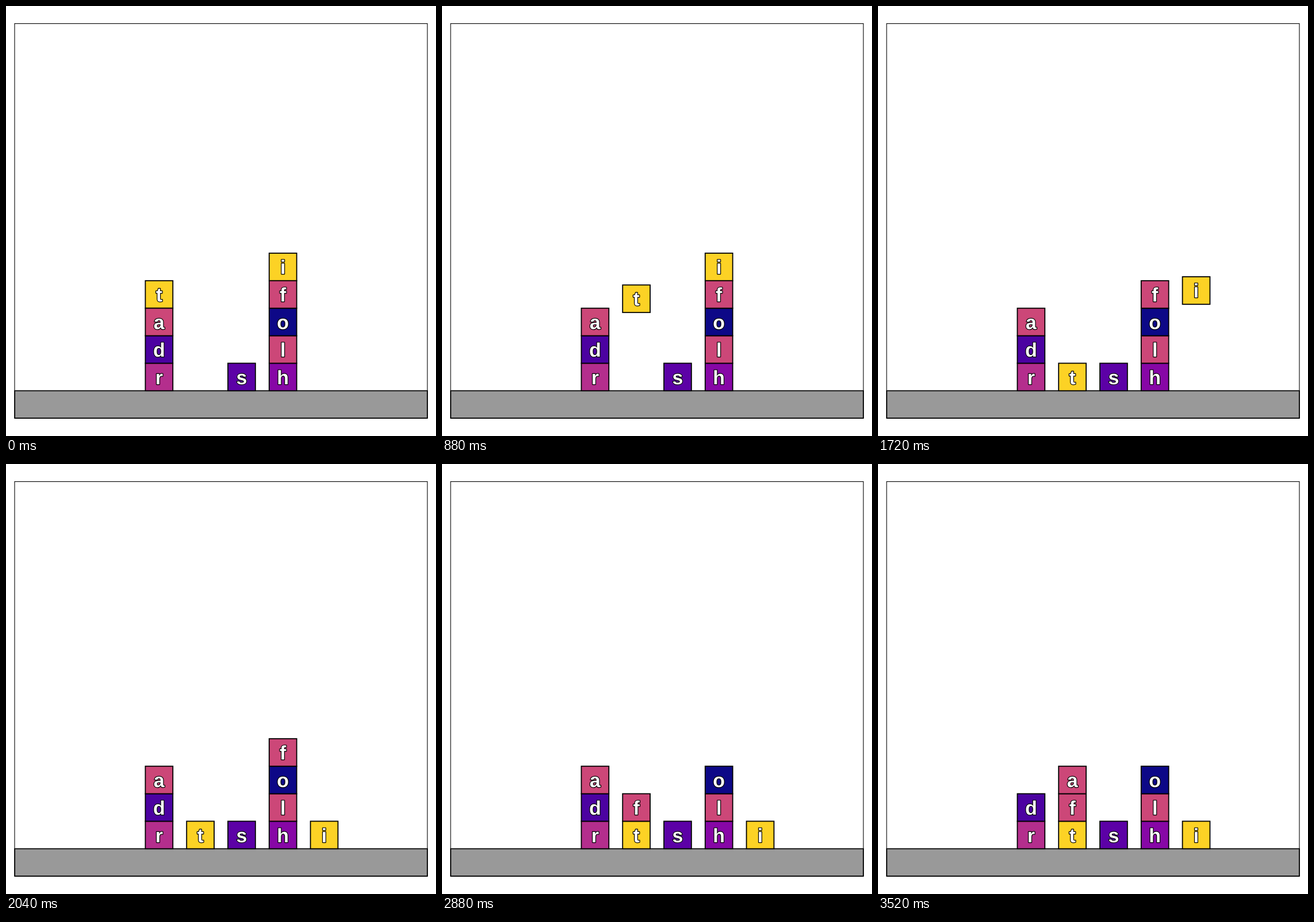
Recreate the animation shown at these times as an HTML page. Size 748 by 748 pixels, loop 3.56 s.

```html
<!DOCTYPE html>
<html lang="en">
<head>
<meta charset="utf-8">
<title>Stacking blocks</title>
<style>
  html, body { margin: 0; width: 100%; height: 100%; overflow: hidden; background: #fff; }
  svg { display: block; --u: 47.87px; --col: 71.8px; }

  .frame { fill: none; stroke: #000; stroke-width: 1.1; }
  .ground { fill: #999; stroke: #000; stroke-width: 1.7; }

  .block {
    transform: translate(calc(242.4px + var(--x) * var(--col)),
                         calc(669.3px - (var(--y) + 1) * var(--u)));
  }
  .block rect { width: var(--u); height: var(--u); fill: var(--c); stroke: #000; stroke-width: 1.8; }
  .block text {
    font: bold 34px "Liberation Sans", Arial, sans-serif;
    text-anchor: middle;
    text-rendering: geometricPrecision;
    fill: #fff; stroke: #000; stroke-width: 2.4; stroke-linejoin: round;
    paint-order: stroke;
  }

  /* One tick is 40 ms, 89 ticks per loop; each move goes up, across, down. */
  .move { animation: 3560ms -1ms linear infinite; }
  .t { animation-name: t; }
  .i { animation-name: i; }
  .f { animation-name: f; }
  .a { animation-name: a; }

  @keyframes t {
    0% { translate: 0 0; animation-timing-function: steps(9); }
    10.1124% { translate: 0 calc(-3.5 * var(--u)); animation-timing-function: steps(4); }
    14.6067% { translate: var(--col) calc(-3.5 * var(--u)); animation-timing-function: steps(16); }
    32.5843%, 100% { translate: var(--col) calc(3 * var(--u)); }
  }
  @keyframes i {
    0% { translate: 0 0; }
    32.5843% { translate: 0 0; animation-timing-function: steps(4); }
    37.0787% { translate: 0 calc(-1.5 * var(--u)); animation-timing-function: steps(4); }
    41.5730% { translate: var(--col) calc(-1.5 * var(--u)); animation-timing-function: steps(14); }
    57.3034%, 100% { translate: var(--col) calc(4 * var(--u)); }
  }
  @keyframes f {
    0% { translate: 0 0; }
    57.3034% { translate: 0 0; animation-timing-function: steps(4); }
    61.7978% { translate: 0 calc(-1.5 * var(--u)); animation-timing-function: steps(8); }
    70.7865% { translate: calc(-2 * var(--col)) calc(-1.5 * var(--u)); animation-timing-function: steps(9); }
    80.8989%, 100% { translate: calc(-2 * var(--col)) calc(2 * var(--u)); }
  }
  @keyframes a {
    0% { translate: 0 0; }
    80.8989% { translate: 0 0; animation-timing-function: steps(6); }
    87.6404% { translate: 0 calc(-2.5 * var(--u)); animation-timing-function: steps(4); }
    92.1348% { translate: var(--col) calc(-2.5 * var(--u)); animation-timing-function: steps(6); }
    98.8764%, 100% { translate: var(--col) 0; }
  }
</style>
</head>
<body>
<svg width="748" height="748">
  <rect class="ground" x="15.2" y="669.3" width="717.8" height="47.6"/>
  <rect class="frame" x="15" y="30.6" width="718" height="686.4"/>

  <g class="block" style="--x:0; --y:0; --c:#b42e8d"><rect/><text x="23.9" y="36.2">r</text></g>
  <g class="block" style="--x:0; --y:1; --c:#4c02a1"><rect/><text x="23.9" y="36.2">d</text></g>
  <g class="block" style="--x:2; --y:0; --c:#5c01a6"><rect/><text x="23.9" y="36.2">s</text></g>
  <g class="block" style="--x:3; --y:0; --c:#8707a6"><rect/><text x="23.9" y="36.2">h</text></g>
  <g class="block" style="--x:3; --y:1; --c:#cc4778"><rect/><text x="23.9" y="36.2">l</text></g>
  <g class="block" style="--x:3; --y:2; --c:#0d0887"><rect/><text x="23.9" y="36.2">o</text></g>

  <g class="block move t" style="--x:0; --y:3; --c:#fcd225"><rect/><text x="23.9" y="36.2">t</text></g>
  <g class="block move i" style="--x:3; --y:4; --c:#fcd225"><rect/><text x="23.9" y="36.2">i</text></g>
  <g class="block move f" style="--x:3; --y:3; --c:#cc4778"><rect/><text x="23.9" y="36.2">f</text></g>
  <g class="block move a" style="--x:0; --y:2; --c:#cc4778"><rect/><text x="23.9" y="36.2">a</text></g>
</svg>
</body>
</html>
```
